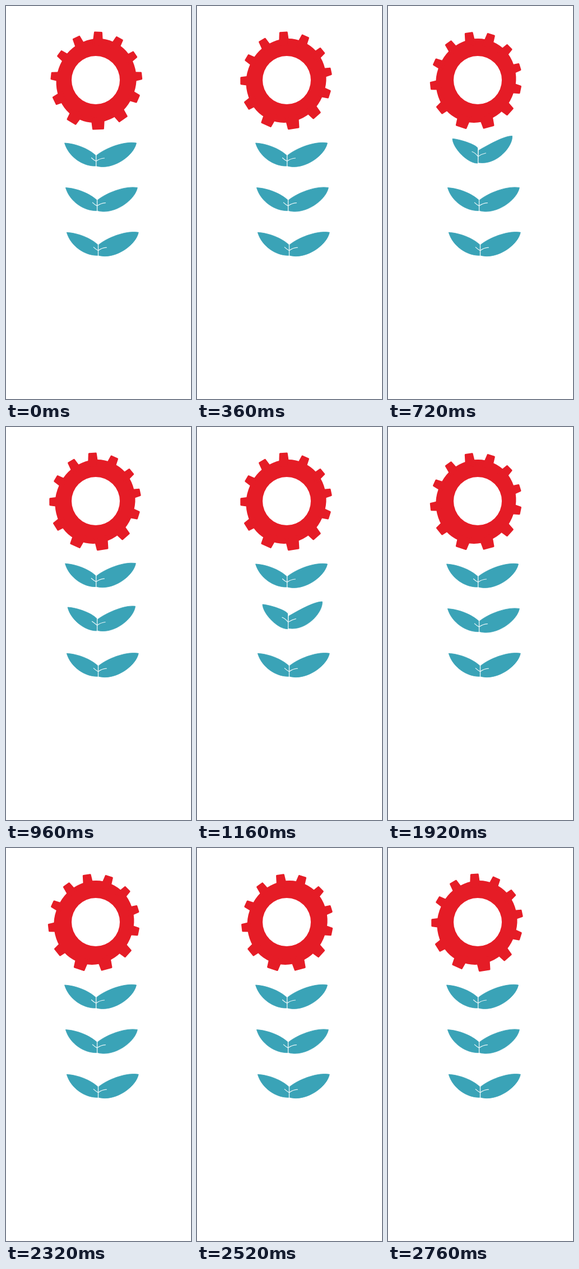
Recreate the animation shown at these times as an HTML page. Size 330x700 px, loop 2.8 s.

```html
<!DOCTYPE html>
<html lang="en">
<head>
<meta charset="utf-8">
<title>Gear flower</title>
<style>
  html, body { margin: 0; width: 100%; height: 100%; overflow: hidden; background: #fff; }
  svg { display: block; width: 330px; height: 700px; }
  #gear { fill: #e51c26; stroke: #e51c26; stroke-width: 3; stroke-linejoin: round; }
  .leaf { fill: #3aa3b7; stroke: #3aa3b7; stroke-width: .8; stroke-linejoin: round; }
  .vein { fill: none; stroke: #e9f6f8; stroke-width: 1.2; stroke-linecap: round; }
</style>
</head>
<body>
<svg viewBox="0 0 330 700">
  <g id="gear">
    <ellipse rx="69" ry="74" transform="rotate(24)"/>
    <path id="teeth"/>
  </g>
  <circle cx="160" cy="132" r="43" fill="#fff"/>
  <g id="leaves"></g>
</svg>
<script>
const STEP = 40, LOOP = 2800, CYCLE = 400, TEETH = 12;
const gear = document.getElementById("gear");
const teeth = document.getElementById("teeth");
const leaves = document.getElementById("leaves");

// resting and raised outlines: left blade, right blade, veins
const shapes = [
  ["M104.5 244 C124 245 147 254 160 266 L160 285 C139 286 112 270 104.5 244 Z",
   "M115 236.5 C122 236 158 246 160.5 254 L160 280 C143 281 116 254 115 236.5 Z"],
  ["M161.5 266 C176 254 210 240 232.5 244 C228 267 190 293 161.5 285 Z",
   "M162 257 C176 249 207 231 221.5 231.5 C223 250 194 284 161.5 279 Z"],
  ["M160.7 266 L160.7 285 M152.5 270.5 Q156 274 160.7 276.5 Q167 271.5 175.5 271",
   "M160.7 250 L160.7 280 M150 259.5 Q155 261 160.7 268 Q167 263.5 174.5 262"]
];

const rad = deg => deg * Math.PI / 180;
const cos = deg => Math.cos(rad(deg));
const sin = deg => Math.sin(rad(deg));
const ease = v => (1 - cos(180 * Math.max(0, Math.min(1, v)))) / 2;

function svgNode(name, attrs, parent) {
  const node = document.createElementNS("http://www.w3.org/2000/svg", name);
  for (const key in attrs) node.setAttribute(key, attrs[key]);
  return parent.appendChild(node);
}

function mixPath([from, to], p) {
  const ends = to.match(/[\d.]+/g);
  let i = 0;
  return from.replace(/[\d.]+/g, n => (+n + (ends[i++] - n) * p).toFixed(2));
}

// teeth crowd towards the upper left and are widest at the bottom
function tooth(turn) {
  const a = turn - 6.5 * sin(turn - 20);
  const r = 83 + 3 * cos(2 * a - 20);
  const tip = (13 - 3 * cos(a) + 2 * cos(2 * a)) / 2;
  const root = tip + 2;
  const pt = (d, w) => `${(d * sin(a) + w * cos(a)).toFixed(2)} ${(w * sin(a) - d * cos(a)).toFixed(2)}`;
  return `M${pt(64, -root)}L${pt(r, -tip)} ${pt(r, tip)} ${pt(64, root)}Z`;
}

function drawGear(t) {
  const p = (t % CYCLE) / CYCLE;
  const x = 159 + 3.6 * cos(360 * p - 54);
  gear.setAttribute("transform", `translate(${x.toFixed(2)} 133)`);
  let d = "";
  for (let k = 0; k < TEETH; k++) d += tooth(k * 360 / TEETH + 60 * p);
  teeth.setAttribute("d", d);
}

const pairs = [0, 1, 2].map(i => {
  const g = svgNode("g", { transform: `translate(${1.9 * i} ${79.6 * i})` }, leaves);
  return ["leaf", "leaf", "vein"].map(name => svgNode("path", { class: name }, g));
});

const lift = t => ease((t - 480) / 200) - ease((t - 800) / 200);

function draw(t) {
  drawGear(t);
  pairs.forEach((paths, i) => {
    const p = lift(t - i * CYCLE);
    paths.forEach((path, k) => path.setAttribute("d", mixPath(shapes[k], p)));
  });
}

function tick() {
  draw(Math.floor((performance.now() % LOOP) / STEP) * STEP);
  requestAnimationFrame(tick);
}
tick();
</script>
</body>
</html>
```
